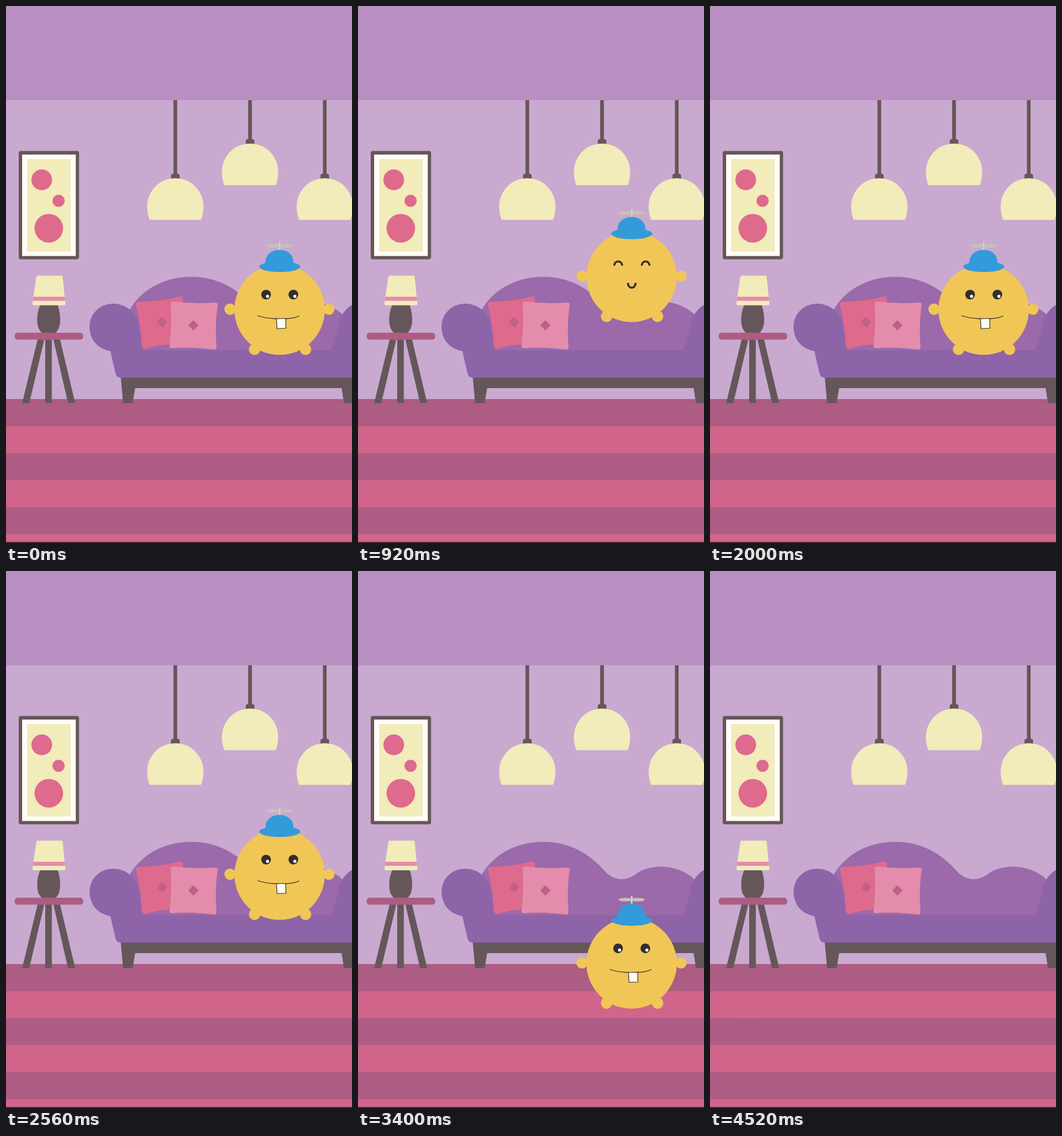
Write an HTML page that moves like this. It is 600 px wide and 929 px high and loops after 4.56 s.

```html
<!DOCTYPE html>
<html lang="en">
<head>
<meta charset="utf-8">
<title>Bouncing ball in a living room</title>
<style>
  html, body { margin: 0; width: 100%; height: 100%; overflow: hidden; background: #b78fc0; }
  svg { display: block; width: 100%; height: 100%; }
  .dark { fill: #655759; }
  .cream { fill: #f2ebba; }
  .rose { fill: #de6a8e; }
  .plum { fill: #ad5c84; }
  .skin { fill: #f0c656; }
  .hat { fill: #339bd9; }
  .ink { fill: none; stroke: #332d2e; }
</style>
</head>
<body>
<svg viewBox="0 0 600 929">
  <defs>
    <g id="lamp">
      <path class="dark" d="M-3.2-240H3.2V-56.5H4.5Q7.5-56 7.5-53V-47H-7.5V-53Q-7.5-56-4.5-56.5H-3.2Z"/>
      <path class="cream" d="M-44.5 23.3C-47.5 16-48.8 8-48.8 0A48.8 48.8 0 0 1 48.8 0C48.8 8 47.5 16 44.5 23.3Z"/>
    </g>
    <clipPath id="room"><rect y="163" width="600" height="766"/></clipPath>
  </defs>

  <rect width="600" height="929" fill="#b78fc0"/>
  <rect y="163" width="600" height="518" fill="#c9a9d0"/>
  <g id="floor"></g>
  <rect y="927.5" width="600" height="2" fill="#24161e"/>

  <g clip-path="url(#room)">
    <use href="#lamp" x="293.6" y="346.7"/>
    <use href="#lamp" x="423.2" y="286.7"/>
    <use href="#lamp" x="552.8" y="346.7"/>
  </g>

  <!-- picture -->
  <rect class="dark" x="22" y="250.8" width="104.7" height="187.4" rx="4"/>
  <rect x="28" y="257" width="93" height="175.5" fill="#fffdf6"/>
  <rect class="cream" x="36.7" y="264.7" width="75.3" height="160"/>
  <g class="rose">
    <circle cx="62" cy="300.7" r="18"/>
    <circle cx="91.2" cy="337" r="10.6"/>
    <circle cx="74.2" cy="384.5" r="24.8"/>
  </g>

  <!-- side table -->
  <path class="dark" d="M55 576H66.5L40.5 687H28ZM68 576H79.5V687H68ZM82 576H93.5L120 687H107.5Z"/>
  <path class="dark" d="M60 516H89Q94 529 94 543Q94 560 84 567H64Q54 560 54 543Q54 529 60 516Z"/>
  <rect class="plum" x="15" y="565.2" width="118.7" height="12" rx="5"/>
  <path class="cream" d="M55 466.5H96Q98 466.5 98.3 469L103 515Q103 517.7 100.500 517.700H48Q45.500 517.700 45.700 515L52.500 469Q53 466.500 55 466.500Z"/>
  <path d="M47.5 503H101.700L102.400 510H46.400Z" fill="#e48cab"/>

  <!-- sofa -->
  <path class="dark" d="M199 642H600V687H586L582 661H224L219.500 687H203Z"/>
  <rect x="224" y="661" width="358" height="19" fill="#c9a9d0"/>
  <path d="M212 530C232 491 274 468.500 321 468.500C369 468.500 403 491 427 518C443 537 466 537 482 524C506 506 556 505 586 536L570 600H225Z" fill="#9c69aa"/>
  <path d="M181 597C156 592 145 575 145 555C145 532 163 515 186 515C210 515 226 531 231 556L237 595.500H561Q566 595 568 588L578 547Q584 526 600 517V643H199Q192 643 190 636Z" fill="#8c64a7"/>
  <path class="rose" d="M229 512Q268 511 302 502.500Q307 502.500 307 508L298 584Q265 586 241 593Q236 593 235.500 588Q234 550 225 517Q225 512 229 512Z"/>
  <path d="M290 511Q325 516 363 513Q368 513 367 518Q362 552 365 590Q365 595 360 594.500Q325 589 288 592Q283 592 283.500 588Q288 550 285.500 515Q286 511 290 511Z" fill="#e48cab"/>
  <g fill="#c05f87">
    <path d="M269 538L279.500 546L271.500 556L262 548Z"/>
    <path d="M325 543.500L334 552.500L325 561.500L316 552.500Z"/>
  </g>

  <g id="dust" fill="#e79bb8"></g>

  <g id="hero">
    <g class="skin">
      <circle cx="388.500" cy="524.500" r="9.800"/>
      <circle cx="560" cy="524.500" r="9.800"/>
      <circle cx="431" cy="594" r="9.900"/>
      <circle cx="519.500" cy="594" r="9.900"/>
      <circle cx="474.500" cy="525.200" r="78.400"/>
    </g>
    <g fill="#c5c1b8">
      <ellipse cx="463.500" cy="415" rx="11.700" ry="3.100"/>
      <ellipse cx="485.500" cy="415" rx="11.700" ry="3.100"/>
      <rect x="473" y="408.500" width="3.200" height="18.500" rx="1.500" fill="#d2cec8"/>
    </g>
    <g class="hat">
      <ellipse cx="474.700" cy="451" rx="35.700" ry="9.300"/>
      <path d="M450 447V443C450 430 461 422 474.300 422S498.500 430 498.500 443V447Z"/>
    </g>
    <g id="calm">
      <g fill="#332d2e">
        <circle cx="451" cy="499.300" r="8.400"/>
        <circle cx="498.300" cy="499.300" r="8.400"/>
      </g>
      <g fill="#fff">
        <circle cx="453.600" cy="502.200" r="2.700"/>
        <circle cx="501" cy="502.200" r="2.700"/>
      </g>
      <path class="ink" stroke-width="1.300" d="M436.500 535.500C452 542 494 544 508.500 536"/>
      <path d="M469 541L485 540.500L485.500 557.500L470 558Z" fill="#fffdf8" stroke="#332d2e" stroke-width="1.200"/>
    </g>
    <g id="happy" class="ink" stroke-width="3.600">
      <path d="M444.300 506C445 496.500 457.500 496.500 458.200 506"/>
      <path d="M492 506C492.700 496.500 505 496.500 505.700 506"/>
      <path d="M468 536C468.700 547 480.700 547 481.400 536"/>
    </g>
  </g>
</svg>
<script>
const LOOP = 4560, STEP = 40;
const CX = 474.5, GROUND = 603.5;
const $ = id => document.getElementById(id);
const NS = 'http://www.w3.org/2000/svg';

function add(parent, tag, attrs) {
  const el = document.createElementNS(NS, tag);
  for (const k in attrs) el.setAttribute(k, attrs[k]);
  return parent.appendChild(el);
}

for (let i = 0; i < 6; i++) {
  add($('floor'), 'rect', {
    x: 0, y: 680 + i * 46.75, width: 600, height: 47,
    fill: i % 2 ? '#d1658b' : '#ad5c84'
  });
}

const part = (t, from, to) => Math.min(1, Math.max(0, (t - from) / (to - from)));
const inOut = p => p < .5 ? 4 * p ** 3 : 1 - 4 * (1 - p) ** 3;
const bump = (t, a, b, c) =>
  Math.sin(Math.PI / 2 * (t < b ? part(t, a, b) : 1 - part(t, b, c)));

const hop = t => {
  const p = part(t, 200, 1080) * 2 - 1;
  return 95.7 * (1 - p * p);
};
const drop = t => 156 * inOut(part(t, 2870, 3500));
const run = t => -600 * inOut(part(t, 3790, 4420));
const squash = t => bump(t, 0, 110, 200) + bump(t, 1080, 1240, 1440);

// born, x, y, size
const puffs = [
  [3840, 533, 755, 12], [3840, 517, 781, 11], [3880, 485, 774, 7],
  [4040, 430, 762, 14], [4080, 370, 774, 13], [4120, 300, 756, 13],
  [4160, 220, 770, 14], [4200, 140, 758, 12], [4240, 60, 772, 12]
].map(([born, cx, cy, size]) => ({ born, size, el: add($('dust'), 'circle', { cx, cy }) }));

function draw(t) {
  const k = squash(t);
  const x = CX + run(t), y = GROUND + drop(t) - hop(t);
  $('hero').setAttribute('transform',
    `translate(${x} ${y}) scale(${1 + .085 * k} ${1 - .09 * k}) translate(${-CX} ${-GROUND})`);
  const glad = t >= 120 && t < 1480;
  $('happy').style.display = glad ? '' : 'none';
  $('calm').style.display = glad ? 'none' : '';
  for (const { born, size, el } of puffs) {
    const p = part(t, born, born + 360);
    el.setAttribute('r', size * (.8 + .6 * p));
    el.setAttribute('opacity', t < born ? 0 : .15 * (1 - p));
  }
}

const start = performance.now();
function tick(now) {
  const t = Math.max(0, now - start) % LOOP;
  draw(Math.floor(t / STEP) * STEP);
  requestAnimationFrame(tick);
}
draw(0);
requestAnimationFrame(tick);
</script>
</body>
</html>
```
